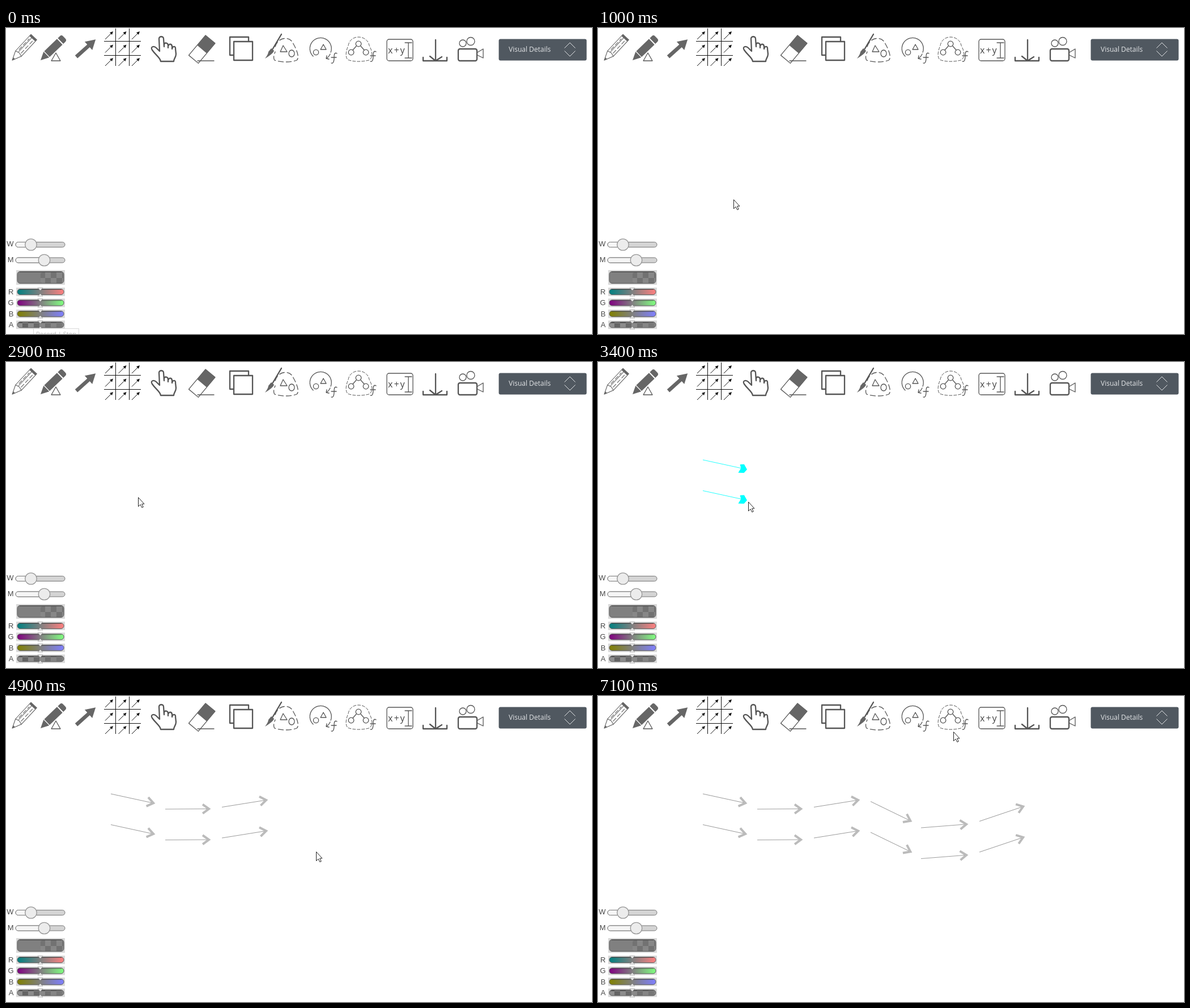
Recreate the animation shown at these times as an HTML page. Size 1034x541 px, loop 8 s.

```html
<!DOCTYPE html>
<html lang="en">
<head>
<meta charset="utf-8">
<title>Drawing board</title>
<style>
html, body { margin: 0; width: 100%; height: 100%; overflow: hidden; background: #fff; }
svg { display: block; width: 100%; height: 100%; }
.label { font: 13px "Liberation Sans", Arial, sans-serif; fill: #484848; }
.ui { font-family: "Open Sans", sans-serif; }
.ink { fill: none; stroke: #555; stroke-width: 1.3; stroke-linecap: round; stroke-linejoin: round; }
.bold { stroke-width: 2.3; }
.thin { stroke-width: 1; }
.solid { fill: #666; stroke: none; }
.grid { fill: none; stroke: #111; stroke-width: 1; }
.shaft { stroke: #888; stroke-width: .8; }
.head { fill: none; stroke: #bbb; stroke-width: 4; }
.fresh .shaft { stroke: #0ff; }
.fresh .head { fill: #0ff; stroke: none; }
</style>
</head>
<body>
<svg viewBox="0 0 1034 541">
  <defs>
    <pattern id="checker" width="20" height="20" x="19" y="432" patternUnits="userSpaceOnUse">
      <path d="M0 0H20V20H0Z" fill="#909090"/>
      <path d="M0 0H10V10H0ZM10 10H20V20H10Z" fill="#606060"/>
    </pattern>
    <linearGradient id="fade">
      <stop stop-color="#808080" stop-opacity="0"/>
      <stop offset="1" stop-color="#808080" stop-opacity=".8"/>
    </linearGradient>
    <path id="fn" d="M584 45Q579 42 579 51Q579 64 574 62M574 52H583"/>
    <g id="cell">
      <path class="grid" d="M-7 7L5 -5"/>
      <path d="M7 -7L5 -1L1 -5Z" fill="#111"/>
    </g>
  </defs>

  <g class="ink">
    <g id="pencil" class="thin" transform="translate(11 57) rotate(-47)">
      <path d="M0 0L16 -7H56V7H16ZM16 -7L18 0L16 7M18 -2H52"/>
      <path d="M22 -4H48M20 3H50" stroke-dasharray="7 4"/>
      <path class="solid" d="M0 0L5 -2V2ZM52 -7H56V7H52Z"/>
    </g>
    <g class="solid" transform="translate(61 57) rotate(-44)">
      <path d="M0 0L14 -7H47V7H14ZM49 -7H54Q58 -7 58 -3V3Q58 7 54 7H49Z"/>
      <path d="M15 -7V7" stroke="#fff"/>
    </g>
    <path d="M88 44L80 58H96Z" fill="#fff"/>
    <path class="solid" transform="translate(124 51) rotate(-42)" d="M0 -3.3H29V-10L46 0L29 10V3.3H0Z"/>
    <path class="bold" d="M273 59C272 52 264 48 258 39C254 33 261 31 265 35L271 41L270 19C270 14 278 14 278 19L279 33V29C280 25 286 26 286 31V35V32C288 27 293 28 293 33V37C294 31 300 32 299 37L300 46C300 52 296 54 296 59Z"/>
    <!-- eraser -->
    <g transform="translate(360.5 20) rotate(130)">
      <rect width="46" height="22" y="-11"/>
      <rect class="solid" width="23" height="22" y="-11"/>
    </g>
    <path d="M338 58H367"/>
    <!-- copies -->
    <path class="bold" d="M402 48H395V16H428V24M402 24H435V57H402Z"/>
    <!-- brush -->
    <path class="bold" d="M486 11L470 38"/>
    <path class="solid" d="M468 36L473 40Q472 45 457 54Q463 46 463 42Z"/>
    <path d="M475 33C480 15 502 14 507 28C514 40 518 53 513 57C502 61 486 61 474 57C471 53 473 47 475 42" stroke-dasharray="9 5"/>
    <path d="M489 31L484 42H496Z"/>
    <ellipse cx="504" cy="45" rx="5" ry="6"/>
    <!-- rotate -->
    <path d="M542 50A19 19 0 1 1 573 43M572 46Q569 52 565 54M566 49L565 54L570 55"/>
    <path d="M560 29L555 38H565Z"/>
    <circle cx="547" cy="43" r="4.6"/>
    <use href="#fn"/>
    <!-- graph -->
    <path class="thin" d="M604 31C607 11 637 11 641 31C647 42 648 53 640 57C627 60 613 60 603 56C598 51 600 40 604 31Z" stroke-dasharray="5 3"/>
    <path d="M618 32L612 39M626 32L632 39"/>
    <circle cx="622" cy="28" r="4.8"/><circle cx="609" cy="43" r="4.8"/><circle cx="635" cy="43" r="4.8"/>
    <use href="#fn" x="69" y="-3"/>
    <!-- formula -->
    <rect x="672" y="20" width="46" height="38" rx="4"/>
    <path d="M710 26V53M704 26H716M704 53H716"/>
    <!-- drop -->
    <path class="bold" d="M758 21V58M748 50L758 58L769 51M736 52V58H778V52"/>
    <!-- camera -->
    <rect class="bold" x="798" y="37" width="33" height="21" rx="3"/>
    <circle cx="806" cy="27" r="6"/><circle cx="820" cy="23.5" r="7"/>
    <path d="M832 43L842 37V53L832 48"/>
  </g>
  <text class="ui" x="674" y="45" font-size="16" letter-spacing="2" fill="#444">x+y</text>
  <g id="field"></g>

  <rect x="869.5" y="19.5" width="155" height="38" rx="3" fill="#505860"/>
  <text class="ui" x="887" y="42" font-size="12" fill="#e2e4e6">Visual Details</text>
  <path d="M985.5 35.5L995 26L1004.5 35.5M985.5 40.5L995 50L1004.5 40.5" fill="none" stroke="#e2e4e6"/>

  <g id="panel"></g>
  <g id="tip">
    <rect x="48.5" y="531.5" width="80" height="20" fill="#fff" stroke="#d8d8d8"/>
    <text class="ui" x="53" y="545" font-size="11" fill="#bbb">Record | Stop</text>
  </g>
  <g id="arrows"></g>
  <path id="cursor" d="M.5 .5V16.5L4 13L6.8 18.4L9.2 17.3L6.6 12H11Z" fill="#fff" stroke="#222"/>
</svg>
<script>
const $ = id => document.getElementById(id);
const NS = "http://www.w3.org/2000/svg";
const panel = $("panel");

function add(parent, tag, attrs, text) {
  const el = document.createElementNS(NS, tag);
  for (const k in attrs) el.setAttribute(k, attrs[k]);
  if (text) el.textContent = text;
  parent.append(el);
  return el;
}

for (let i = 0; i < 9; i++)
  add($("field"), "use", { href: "#cell", x: 182 + i % 3 * 23.5, y: 13 + Math.floor(i / 3) * 23.5 });
for (const k of [0, 1])
  add($("field"), "path", { class: "grid", d: `M${193.5 + 24 * k} 1V67M173 ${23.5 + 25 * k}H238` });

function label(s, y) {
  add(panel, "text", { class: "label", x: 13.5, y, "text-anchor": "end" }, s);
}

function slider(name, y, knob) {
  label(name, y + 3);
  const track = { x: 17, y: y - 4.5, width: 87, height: 9, rx: 4.5, fill: "#d4d4d4", stroke: "#777" };
  add(panel, "rect", track);
  add(panel, "rect", { ...track, width: knob - 17, fill: "#f5f5f5" });
  add(panel, "circle", { cx: knob, cy: y, r: 10.2, fill: "#ececec", stroke: "#999", "stroke-width": 1.3 });
}

// Layered pill with a dark upper rim
function bar(y, h, ...fills) {
  add(panel, "rect", { x: 18, y: y - 2.5, width: 86, height: h + 5, fill: "#dadada" });
  const pill = { x: 20, y, width: 82, height: h, rx: 5 };
  for (const fill of fills) add(panel, "rect", { ...pill, fill });
  add(panel, "rect", { ...pill, fill: "none", stroke: "#5c5c5c" });
  add(panel, "path", { d: `M24 ${y + 1}H98`, stroke: "#333", opacity: .5 });
}

function channel(name, i, mix) {
  const y = 466.5 + 19.4 * i;
  label(name, y + 4.5);
  if (mix) {
    const grad = add(panel, "linearGradient", { id: "ch" + name });
    [0, 128, 255].forEach((v, k) => add(grad, "stop", { offset: k / 2, "stop-color": `rgb(${mix(v)})` }));
    bar(y - 5, 10, `url(#ch${name})`);
  } else {
    bar(y - 5, 10, "url(#checker)", "url(#fade)");
  }
  add(panel, "path", { d: `M56 ${y - 7}h9l-4.5 4.5ZM56 ${y + 7.5}h9l-4.5 -4Z`, fill: "#eee", stroke: "#888", "stroke-width": .6 });
}

slider("W", 383, 44);
slider("M", 410.5, 67.5);
bar(430.5, 21, "#808080");
add(panel, "rect", { x: 61, y: 432, width: 40, height: 19, rx: 4, fill: "url(#checker)", opacity: .45 });
["R", "G", "B"].forEach((name, i) =>
  channel(name, i, v => [0, 1, 2].map(k => k === i ? v : 128)));
channel("A", 3);

// Each pair is drawn in one go, the second 400 ms after the first
const shapes = [
  [185, 227.5, 263, 244.5], [281, 254.5, 361, 254], [381, 251, 462, 238],
  [481, 241, 554, 276.5], [570, 287.5, 653, 281], [673, 276, 753, 249]
];
const pairs = [{ press: 2600, release: 3400 }, { press: 4300, release: 4600 }, { press: 5300, release: 5500 }];
const COPY = -54.5;

const strokes = shapes.map(([x1, y1, x2, y2], i) => {
  const { press, release } = pairs[i >> 1];
  const second = i % 2;
  const g = add($("arrows"), "g", {});
  const turn = Math.atan2(y2 - y1, x2 - x1) * 180 / Math.PI;
  const heads = [0, COPY].map(dy => {
    const spot = add(g, "g", { transform: `translate(${x2} ${y2 + dy}) rotate(${turn})` });
    add(spot, "path", { class: "shaft", d: `M${-Math.hypot(x2 - x1, y2 - y1)} 0H-3` });
    return add(spot, "path", { class: "head" });
  });
  return {
    g, heads, at: release + 400 * second,
    stops: [[second ? release + 100 : press, x1, y1], [release + 400 * second, x2 + 2, y2 + 3]]
  };
});

// Cursor stops: time, x, y
const [x0, y0] = shapes[0];
const route = [
  [100, 988, 36], [900, 239, 303], [1700, 239, 303], [2200, x0 - 1, y0],
  ...strokes.flatMap(s => s.stops),
  [6000, 776, 241], [6400, 776, 241], [7100, 627, 63]
];

function locate(t) {
  const i = route.findIndex(p => p[0] > t);
  if (i < 0) return route[route.length - 1].slice(1);
  const [ta, xa, ya] = route[i - 1], [tb, xb, yb] = route[i];
  const k = 1 - (1 - (t - ta) / (tb - ta)) ** 2;
  return [xa + (xb - xa) * k, ya + (yb - ya) * k].map(Math.floor);
}

const CHEVRON = "M-14 -8L-3 0L-14 8";
const BLOB = "M0 0L-7 -8L-14 -6L-11 0L-14 9L-4 7Z";

function draw(now) {
  const t = Math.floor(now % 8000 / 100) * 100;
  const intro = t < 100;
  $("tip").style.display = intro ? "" : "none";
  $("cursor").style.display = intro ? "none" : "";
  if (!intro) $("cursor").setAttribute("transform", `translate(${locate(t).join(" ")})`);
  for (const { g, heads, at } of strokes) {
    const fresh = t < at + 100;
    g.style.display = t < at ? "none" : "";
    g.setAttribute("class", fresh ? "fresh" : "");
    for (const h of heads) h.setAttribute("d", fresh ? BLOB : CHEVRON);
  }
}

const start = performance.now();
function loop() {
  draw(performance.now() - start);
  requestAnimationFrame(loop);
}
loop();
</script>
</body>
</html>
```
